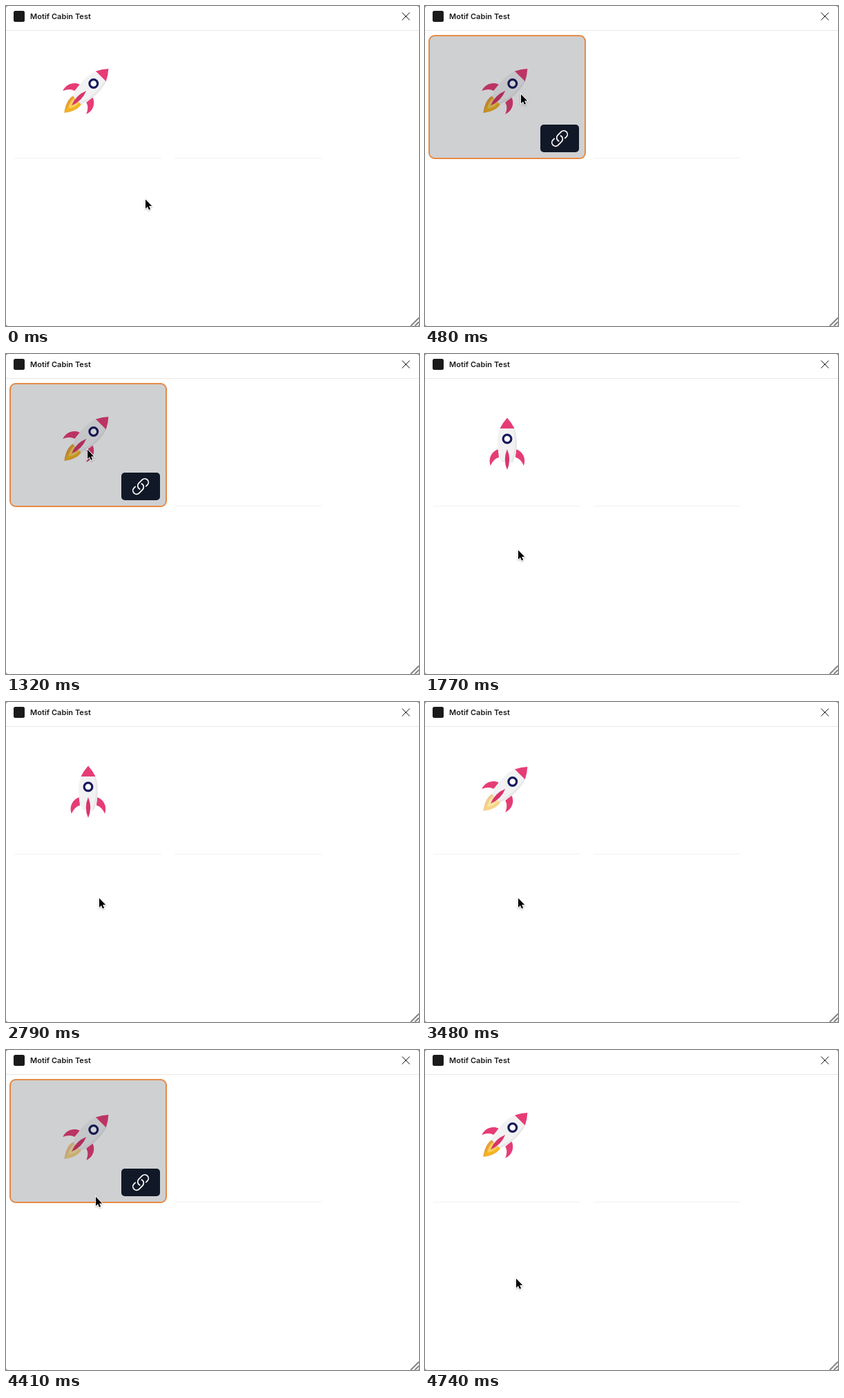
An HTML page that plays this animation: 598 px wide and 464 px high, repeating every 4860 ms.

```html
<!DOCTYPE html>
<html lang="en">
<head>
<meta charset="utf-8">
<title>Motif Cabin Test</title>
<style>
  html, body { margin: 0; width: 100%; height: 100%; overflow: hidden; background: #777; }
  svg { display: block; width: 598px; height: 464px; }
  .title { font: 600 11px Inter, sans-serif; letter-spacing: .05px; fill: #1a1a1a; }
</style>
</head>
<body>
<svg viewBox="0 0 598 464">
  <rect width="598" height="464" rx="3" fill="#fff"/>

  <rect x="11" y="7" width="16" height="16" rx="2.5" fill="#1a1a1a"/>
  <text class="title" x="35" y="19">Motif Cabin Test</text>
  <path d="M573.5 9.5l11 11m0-11l-11 11" stroke="#1a1a1a"/>
  <path d="M0 35.5H598" stroke="#e6e6e6"/>
  <path d="M586 464L598 452M592 464L598 458" stroke="#858585" stroke-width="2"/>
  <path d="M12 220.5H225M244 220.5H457" stroke="#f0f0f0"/>

  <g id="rocket">
    <g id="flame">
      <path d="M-6 29C-13 38-7 51 0 60C7 51 13 38 6 29Z" fill="#e6a03a"/>
      <path d="M-2 31C-6 39-4 50 0 58C7 51 12 38 6 29Z" fill="#f4b41f"/>
      <path d="M-4 31C-7 39-4 46 0 51C4 46 7 39 4 31Z" fill="#f8cf5c"/>
    </g>
    <g fill="#e63c76">
      <path id="fin" d="M-13 15C-22 18-28 28-24 39C-21 32-17 28-12 27Z"/>
      <use href="#fin" transform="scale(-1 1)"/>
    </g>
    <path d="M-10.5-15C-15-5-16 18-8 34H8C16 18 15-5 10.5-15Z" fill="#f2f2f3"/>
    <path d="M10.5-15C15-5 16 18 8 34H5C13 18 12-5 8-15Z" fill="#e8e8ea"/>
    <path d="M0-30.5Q-6-24-10.5-15H10.5Q6-24 0-30.5Z" fill="#e63c76"/>
    <circle r="5.9" fill="#fff" stroke="#17195c" stroke-width="3.2"/>
    <path d="M0 15Q-6.4 30 0 45Q6.4 30 0 15Z" fill="#d9356b"/>
  </g>

  <g id="hover">
    <rect x="7" y="44" width="224" height="176" rx="3" fill="#111820" fill-opacity=".2"/>
    <rect x="6" y="43" width="226" height="178" rx="8" fill="none" stroke="#e68a45" stroke-width="2"/>
    <rect x="167" y="172" width="56" height="40" rx="5" fill="#111827"/>
    <path transform="translate(181 178) scale(1.167)" fill="none" stroke="#fff" stroke-width="1.5"
      stroke-linecap="round" stroke-linejoin="round"
      d="M13.19 8.69a4.5 4.5 0 0 1 1.24 7.24l-4.5 4.5a4.5 4.5 0 0 1-6.36-6.36l1.75-1.76m13.35-.62l1.76-1.76a4.5 4.5 0 0 0-6.36-6.36l-4.5 4.5a4.5 4.5 0 0 0 1.24 7.24"/>
  </g>

  <g id="cursor">
    <path id="arrow" d="M0 0V13.2l3-2.8 2 4.6 2.1-.9-2-4.5h4.1Z"
      stroke="#fff" stroke-width="1.8" paint-order="stroke"
      style="filter: drop-shadow(.5px 1px 1px #0004)"/>
  </g>
</svg>
<script>
const LOOP = 4860, STEP = 30, RESET = 1740;
const [rocket, flame, hover, cursor] =
  ['rocket', 'flame', 'hover', 'cursor'].map(id => document.getElementById(id));

const ramp = (t, from, to) => Math.min(1, Math.max(0, (t - from) / (to - from)));
const ease = (t, from, to) => { const u = ramp(t, from, to); return u * u * (3 - 2 * u); };
const mix = (a, b, u) => a.map((v, i) => v + (b[i] - v) * u);

// Shrinking circle that sinks over the card.
function circle(t) {
  const p = ramp(t, 480, 1620), size = 1 - p / 2, angle = -10.1 * p;
  return [111 + 28 * size * Math.cos(angle), 128 + 43 * p + 36 * size * Math.sin(angle)];
}

// Single arch across the lower half of the card.
function arch(t) {
  const p = ramp(t, 3930, 4380);
  return [98 + 32 * p, 210 - 56 * Math.sin(Math.PI * p)];
}

function pointer(t) {
  const below = [135, 284.5];
  if (t < RESET + STEP) return mix(mix([202, 280.5], circle(t), ease(t, 0, 480)), below, ease(t, 1610, 1770));
  return mix(mix(below, arch(t), ease(t, 3480, 3870)), [132, 331.5], ease(t, 4380, 4710));
}

function draw(t) {
  const flying = t < RESET;
  const turn = flying ? 1 : ease(t, 2790, 3300);
  const boost = flying ? 1 : ease(t, 4470, 4680);
  const glow = flying ? 1 : ease(t, 3200, 3450);
  const shade = ease(t, 210, 310) - ease(t, 1660, 1740) + ease(t, 3810, 3910) - ease(t, 4440, 4530);

  rocket.setAttribute('transform',
    `translate(${119 + 7.8 * turn} ${123 - 7.5 * turn - 3 * boost}) rotate(${45 * turn})`);
  flame.setAttribute('opacity', .55 * glow + .45 * boost);
  hover.setAttribute('opacity', shade);
  cursor.setAttribute('transform', `translate(${pointer(t)})`);
}

const start = performance.now();
function tick() {
  const t = (performance.now() - start) % LOOP;
  draw(Math.floor(t / STEP) * STEP);
  requestAnimationFrame(tick);
}
draw(0);
requestAnimationFrame(tick);
</script>
</body>
</html>
```
